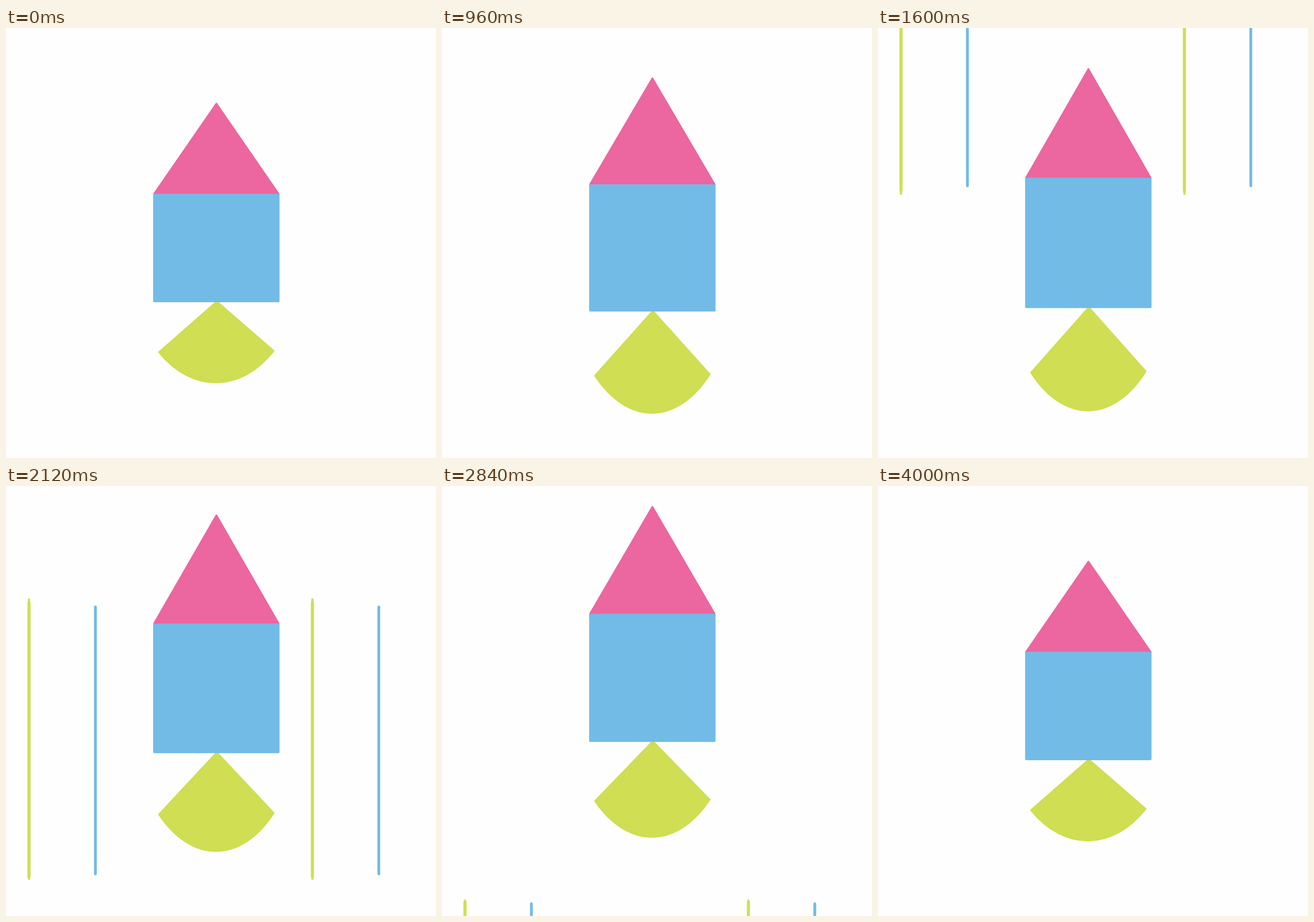
Recreate the animation shown at these times as an HTML page with a canvas. Size 748 by 748 pixels, loop 5 s.

```html
<!DOCTYPE html>
<html lang="en">
<head>
<meta charset="utf-8">
<title>Rocket</title>
<style>
html, body { margin: 0; width: 100%; height: 100%; overflow: hidden; background: #fefefe; }
canvas { display: block; width: 100vw; height: 100vh; }
</style>
</head>
<body>
<canvas id="stage" width="748" height="748"></canvas>
<script>
const SIZE = 748, LOOP = 5000, STEP = 40;
const PINK = '#ec669f', BLUE = '#72bbe7', GREEN = '#cfde52';
const IGNITE = 1000, LIFT = 1120, APEX = 2840, LAND = 4000;
const CENTER = 383;
const ctx = document.getElementById('stage').getContext('2d');

const progress = (t, from, to) => Math.min(1, Math.max(0, (t - from) / (to - from)));
const mix = (a, b, u) => a + (b - a) * u;
const swing = u => (1 - Math.cos(Math.PI * u)) / 2;
const power = p => u => u ** p;

// Grows from zero to peak at ignition, drifts to hold at the apex, fades on landing
function stretch(t, peak, hold, drift, fade) {
  if (t < IGNITE) return peak * progress(t, 0, IGNITE) ** 4;
  if (t < APEX) return mix(peak, hold, drift(progress(t, IGNITE, APEX)));
  return mix(hold, 0, fade(progress(t, APEX, LAND)));
}

function rise(t) {
  const height = 49;
  if (t < APEX) return height * swing(progress(t, LIFT, APEX));
  return height * (1 - progress(t, APEX, LAND) ** 1.4);
}

function softFill(color) {
  ctx.closePath();
  ctx.fillStyle = ctx.strokeStyle = color;
  ctx.lineWidth = 3;
  ctx.lineJoin = 'round';
  ctx.fill();
  ctx.stroke();
}

function drawRocket(t) {
  const body = 1 + stretch(t, 0.205, 0.183, power(2), power(1.4));
  const flame = 1 + stretch(t, 0.265, 0.182, swing, power(0.9));
  const mid = CENTER - rise(t);
  const nose = mid - 253 * body;
  const top = mid - 94.5 * body;
  const floor = mid + 94 * body;
  const side = mid + 181 * flame;
  const bottom = mid + 235 * flame;

  const left = 266.3, right = 465.5, tilt = 2.4, reach = 57;
  const bow = side + (bottom - 1.5 - side) * 4 / 3 + tilt / 6;
  ctx.beginPath();
  ctx.moveTo(366.7, floor - 1.2);
  ctx.lineTo(left, side);
  ctx.bezierCurveTo(left + reach, bow, right - reach, bow, right, side - tilt);
  softFill(GREEN);

  ctx.beginPath();
  ctx.moveTo(366, nose + 1.5);
  ctx.lineTo(257.6, top);
  ctx.lineTo(474.2, top);
  softFill(PINK);

  ctx.fillStyle = BLUE;
  ctx.beginPath();
  ctx.roundRect(256, top, 219.8, floor - top, [0, 0, 2, 2]);
  ctx.fill();
}

// A line that is drawn downwards, then wiped downwards
function streak(x, t, width, color, lead) {
  const sweep = start => SIZE * swing(progress(t, start, start + 1352));
  const head = sweep(1037 - lead), tail = sweep(1642 + lead), r = width / 2;
  if (head - tail < width) return;
  ctx.strokeStyle = color;
  ctx.lineWidth = width;
  ctx.lineCap = 'round';
  ctx.beginPath();
  ctx.moveTo(x, tail > 0 ? tail + r : -r);
  ctx.lineTo(x, head < SIZE ? head - r : SIZE + r);
  ctx.stroke();
}

function frame(now) {
  const t = Math.min(LAND, Math.floor(now % LOOP / STEP) * STEP);
  ctx.fillStyle = '#fefefe';
  ctx.fillRect(0, 0, SIZE, SIZE);
  for (const x of [0, 493]) {
    streak(x + 40, t, 4, GREEN, 16);
    streak(x + 40, t, 5.4, GREEN, 10);
    streak(x + 155.5, t, 4.8, BLUE, 0);
  }
  drawRocket(t);
}

let start;
function tick(now) {
  start ??= now;
  frame(now - start);
  requestAnimationFrame(tick);
}
frame(0);
requestAnimationFrame(tick);
</script>
</body>
</html>
```
